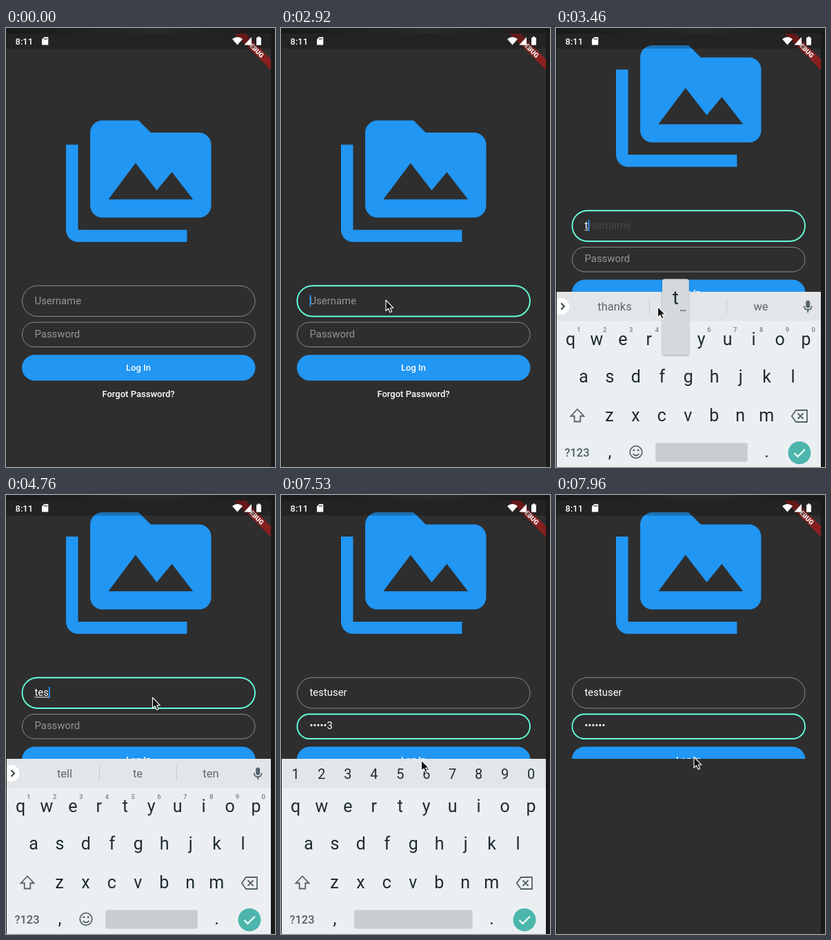
Recreate the animation shown at these times as an HTML page. Size 390 px wide and 634 px high, loop 8000 ms.

```html
<!DOCTYPE html>
<html lang="en">
<head>
<meta charset="utf-8">
<title>Login form</title>
<style>
  html, body { margin: 0; width: 100%; height: 100%; overflow: hidden; background: #1b1b1b; }
  svg { display: block; width: 390px; height: 634px; font-family: Roboto, Arial, sans-serif; }
  .body { font-size: 14.9px; }
  .hint { fill: #969696; }
  .typed { fill: #fff; }
  .label { font-size: 13.03px; font-weight: 500; fill: #fff; text-anchor: middle; }
  .key { font-size: 25px; fill: #1e2b32; text-anchor: middle; }
  .digit { font-size: 20px; fill: #1e2b32; text-anchor: middle; }
  .small { font-size: 9.5px; font-weight: 500; fill: #758086; text-anchor: middle; }
  .word { font-size: 16.5px; fill: #5c686e; text-anchor: middle; }
  .line { fill: none; stroke: #55636b; stroke-width: 1.8; }
</style>
</head>
<body>
<svg viewBox="0 0 390 634">
  <defs>
    <linearGradient id="edge">
      <stop offset="0" stop-color="#191919"/>
      <stop offset=".55" stop-color="#292929"/>
      <stop offset="1" stop-color="#1a1a1a"/>
    </linearGradient>
    <clipPath id="screen"><rect x="1" y="8" width="383" height="626"/></clipPath>
    <clipPath id="viewport"><rect id="view" x="1" y="8" width="383" height="626"/></clipPath>
    <filter id="soft" x="-20%" y="-20%" width="140%" height="140%">
      <feDropShadow dx="0" dy="1" stdDeviation="1.2" flood-opacity=".35"/>
    </filter>
  </defs>

  <rect width="390" height="634" fill="#1b1b1b"/>
  <rect width="390" height="8" fill="url(#edge)"/>
  <rect x="1" y="8" width="383" height="626" fill="#2e2e2e"/>

  <g clip-path="url(#viewport)">
    <g id="page">
      <path transform="translate(87 116) scale(8.77)" fill="#2196f3" d="M2 6H0V20C0 21.1.9 22 2 22H20V20H2ZM22 4H14L12 2H6C4.900 2 4 2.900 4 4V16C4 17.100 4.900 18 6 18H22C23.100 18 24 17.100 24 16V6C24 4.900 23.100 4 22 4ZM7 15L11.500 9 15 13.510 17.500 10.500 21 15Z"/>
      <rect id="userBox" x="23.500" y="372.200" width="337.500" height="44.300" rx="22.150" fill="none"/>
      <rect id="passBox" x="23.500" y="425" width="337.500" height="35.500" rx="17.750" fill="none"/>
      <text id="userHint" class="body hint" x="41.500" y="398.500">Username</text>
      <text id="passHint" class="body hint" x="41.500" y="446.700">Password</text>
      <text id="user" class="body typed" x="41.500" y="398.500"></text>
      <text id="pass" class="body typed" x="41.500" y="446.700"></text>
      <rect id="rule" x="41.500" y="400" height="1" fill="#fff"/>
      <rect id="caret" width="1.900" fill="#2e8df0"/>
      <rect x="23" y="472" width="338.500" height="37.300" rx="18.650" fill="#2196f3"/>
      <text class="label" x="192" y="495.300">Log In</text>
      <text class="label" x="192" y="532.500">Forgot Password?</text>
    </g>
  </g>

  <g clip-path="url(#screen)">
    <g transform="translate(384 8) rotate(45)">
      <rect x="-37.300" y="26.100" width="74.600" height="11.200" fill="#b71c1c" fill-opacity=".63" filter="url(#soft)"/>
      <text x="0" y="35.200" font-size="9.500" font-weight="900" fill="#fff" text-anchor="middle">DEBUG</text>
    </g>
    <rect x="1" y="8" width="383" height="21.700" fill="#000" fill-opacity=".25"/>
    <g fill="#fff">
      <text x="13.500" y="24" font-size="13" font-weight="500">8:11</text>
      <path d="M55.500 13H60Q61.300 13 61.300 14.300V23.400Q61.300 24.600 60 24.600H53.200Q52 24.600 52 23.400V16.500Z"/>
      <path d="M55.600 14.600v2.500M57.400 14.600v2.500M59.200 14.600v2.500" stroke="#222" stroke-width=".9"/>
      <path d="M328 16.100Q335.500 9.900 343 16.100L335.500 24.500Z"/>
      <path d="M356 13V24.500H345.300Z"/>
      <path d="M365 12.500H368V13.700H369.300Q370 13.700 370 14.400V24Q370 24.700 369.300 24.700H363.700Q363 24.700 363 24V14.400Q363 13.700 363.700 13.700H365Z"/>
    </g>

    <g id="board">
      <rect x="1" y="381" width="383" height="253" fill="#ebeff2"/>
      <rect x="1" y="381" width="383" height="42" fill="#e2e6e9"/>
      <g id="keys"></g>
      <path class="line" d="M31 550.500L21.500 560.500H26.700V568.500H35.300V560.500H40.500Z"/>
      <path class="line" d="M348 552H364V569H348L341.800 560.500ZM350.500 556.500L358.500 564.500M358.500 556.500L350.500 564.500"/>
      <text x="30.500" y="619" font-size="16.500" font-weight="500" fill="#53616a" text-anchor="middle">?123</text>
      <text class="key" x="78" y="620" font-size="22">,</text>
      <text class="key" x="305.500" y="620" font-size="22">.</text>
      <rect id="space" y="599.300" height="27.200" rx="2.500" fill="#c8cdd0"/>
      <circle cx="353" cy="613.500" r="16.500" fill="#4db6ac"/>
      <path d="M345.500 614L350.500 619 361 608.500" fill="none" stroke="#fff" stroke-width="2"/>
      <g id="wordMode">
        <g id="supers"></g>
        <circle cx="7.500" cy="402" r="12" fill="#fff"/>
        <path d="M7.500 397.500L12 402 7.500 406.500" fill="none" stroke="#37444b" stroke-width="2"/>
        <text class="word" x="85" y="408"></text>
        <text class="word" x="191" y="408"></text>
        <text class="word" x="297" y="408"></text>
        <path id="bars" d="M135.500 390.500V413M247.500 390.500V413" stroke="#c5cbcf"/>
        <rect x="362.200" y="393.500" width="6" height="11" rx="3" fill="#55636b"/>
        <path class="line" stroke-width="1.500" d="M359.700 401.500Q360 407 365.200 407T370.700 401.500M365.200 407V411"/>
        <circle class="line" cx="116" cy="612.500" r="8.800"/>
        <path class="line" d="M111.500 614.800Q116 620 120.500 614.800"/>
        <path d="M111.600 609.800h2.600M117.800 609.800h2.600" stroke="#55636b" stroke-width="2.400"/>
      </g>
      <g id="numbers"></g>
      <g id="popup">
        <rect x="154" y="362.500" width="38.800" height="109.500" rx="3.500" fill="#d4d9dc" filter="url(#soft)"/>
        <text class="key" x="173.500" y="398.500" style="font-size:27px">t</text>
        <path d="M180 408h2M183 408h2M186 408h2" stroke="#37444b" stroke-width="1.600"/>
      </g>
    </g>
  </g>
  <path id="mouse" d="M.5 .5V16L4 12.700 6.600 18.200 9.200 17 6.700 11.700H11.300Z" fill="#101010" stroke="#fff" stroke-width="1.100" stroke-linejoin="round"/>
</svg>

<script>
const LOOP = 8000, LIFT = 108.5;
const FOCUS_USER = 2920, FOCUS_PASS = 6220, NUMBERS = 6400;
const $ = id => document.getElementById(id);
const words = [...document.querySelectorAll('#wordMode .word')];

// [time, x, y]
const mousePath = [
  [350, 272, 634], [740, 140, 383], [920, 151.5, 392.5], [2920, 151.5, 392.5],
  [3140, 170, 427], [3240, 170, 427], [3460, 147, 402], [3700, 147, 402],
  [4370, 212, 292], [5880, 212, 292], [6050, 204.5, 317.5], [6200, 205, 335],
  [6700, 204, 335], [7200, 203, 375], [7340, 203, 375], [7530, 203, 382.5],
  [7700, 203, 382.5], [7960, 199.5, 378]
];
const userKeys = [3440, 4100, 4760, 5080, 5280, 5430, 5460, 5640];
const passKeys = [6540, 6640, 6760, 6880, 7020, 7160];
const hints = [
  [0, 'thanks', 'I', 'we'], [3700, 'the', 't', 'to'], [4100, 'tell', 'te', 'ten'],
  [4820, '', 'tes', ''], [5080, '', 'test', ''], [5280, '', 'testu', ''],
  [5430, '', 'testus', ''], [5460, '', 'testuse', ''], [5700, '', 'testuser', '']
];

const clamp = v => Math.max(0, Math.min(1, v));
const ramp = (t, a, b) => clamp((t - a) / (b - a));
const smooth = v => v * v * (3 - 2 * v);
const count = (times, t) => times.filter(k => t >= k).length;
const show = (el, on) => { el.style.display = on ? '' : 'none'; };
function set(el, attrs) {
  for (const name in attrs) el.setAttribute(name, attrs[name]);
}
function put(parent, cls, x, y, str) {
  const el = document.createElementNS('http://www.w3.org/2000/svg', 'text');
  set(el, { class: cls, x, y });
  el.textContent = str;
  parent.append(el);
}

[['qwertyuiop', 21, 457.5], ['asdfghjkl', 40, 512], ['zxcvbnm', 77.5, 567.5]].forEach(([row, x, y]) =>
  [...row].forEach((ch, i) => put($('keys'), 'key', x + i * 37.95, y, ch)));
[...'1234567890'].forEach((ch, i) => {
  put($('supers'), 'small', 33 + i * 37.8, 439, ch);
  put($('numbers'), 'digit', 21 + i * 37.95, 409.5, ch);
});

function mouseAt(t) {
  const i = mousePath.findIndex(p => p[0] > t);
  if (i < 0) return mousePath.at(-1).slice(1);
  if (!i) return [0, 700];
  const [a, b] = [mousePath[i - 1], mousePath[i]];
  const k = smooth(ramp(t, a[0], b[0]));
  return [1, 2].map(n => a[n] + (b[n] - a[n]) * k);
}

function outline(el, on) {
  set(el, { stroke: on ? '#64ffda' : '#8c8c8c', 'stroke-width': on ? 1.9 : 1 });
}

function drawForm(t) {
  const onUser = t >= FOCUS_USER && t < FOCUS_PASS, onPass = t >= FOCUS_PASS;
  set($('page'), { transform: `translate(0 ${-LIFT * smooth(ramp(t, 3020, 3120))})` });
  set($('view'), { height: t < 3020 ? 626 : 373 });
  outline($('userBox'), onUser);
  outline($('passBox'), onPass);

  const n = count(passKeys, t);
  $('user').textContent = 'testuser'.slice(0, count(userKeys, t));
  $('pass').textContent = t >= 7700 ? '•'.repeat(n)
    : n ? '•'.repeat(n - 1) + 'abc123'[n - 1] : '';
  set($('userHint'), { opacity: 1 - ramp(t, userKeys[0] - 110, userKeys[0] + 60) });
  set($('passHint'), { opacity: 1 - ramp(t, passKeys[0] - 20, passKeys[0] + 80) });

  const width = $('user').getComputedTextLength();
  set($('rule'), { width: onUser ? width : 0 });
  show($('caret'), onUser || (onPass && t < 7360));
  set($('caret'), onPass
    ? { x: 41.5 + $('pass').getComputedTextLength(), y: 433.5, height: 16 }
    : { x: 41.5 + width, y: 385.5, height: 16.5 });
}

function drawBoard(t) {
  const up = smooth(ramp(t, 3240, 3400)) * (1 - smooth(ramp(t, 7740, 7950)));
  const numeric = t >= NUMBERS;
  show($('board'), up > 0);
  set($('board'), { transform: `translate(0 ${253 * (1 - up)})`, opacity: clamp(up * 2) });
  show($('wordMode'), !numeric);
  show($('numbers'), numeric);
  show($('popup'), t >= 3420 && t < 3700);
  set($('space'), numeric ? { x: 106.3, width: 171.4 } : { x: 144.3, width: 133.4 });
  const row = hints.findLast(h => t >= h[0]);
  words.forEach((el, i) => { el.textContent = row[i + 1]; });
  show($('bars'), row[1]);
}

function draw(t) {
  drawForm(t);
  drawBoard(t);
  set($('mouse'), { transform: `translate(${mouseAt(t)})` });
}

const start = performance.now();
function tick(now) {
  draw(Math.max(0, now - start) % LOOP);
  requestAnimationFrame(tick);
}
draw(0);
requestAnimationFrame(tick);
</script>
</body>
</html>
```
